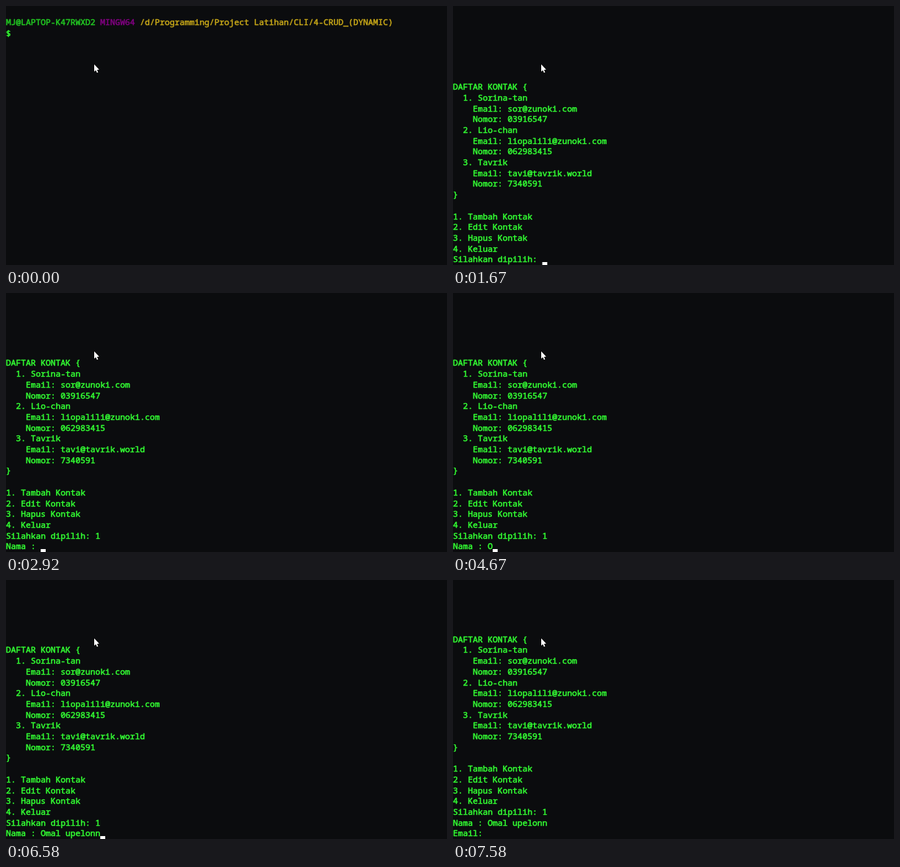
An HTML page with a canvas for the animation above (8000 ms loop, 600 px wide and 353 px high).

```html
<!DOCTYPE html>
<html lang="id">
<head>
<meta charset="utf-8">
<title>Daftar Kontak</title>
<style>
  html, body { margin: 0; width: 100%; height: 100%; overflow: hidden; background: #0b0c0e; }
  canvas { display: block; width: 600px; height: 353px; }
</style>
</head>
<body>
<canvas id="term" width="600" height="353"></canvas>
<script>
const ctx = document.getElementById('term').getContext('2d');
const FPS = 12, TICKS = 96;   // the screen refreshes twelve times a second
const CELL = 6.75, LINE = 14.7, LAST_BASE = 349.3;
const GREEN = '#33ff33', USER = '#22c822', PURPLE = '#800080', GOLD = '#c8a818';

const contacts = [
  ['Sorina-tan', 'sor@zunoki.com', '03916547'],
  ['Lio-chan', 'liopalili@zunoki.com', '062983415'],
  ['Tavrik', 'tavi@tavrik.world', '7340591']
];
const list = [
  'DAFTAR KONTAK {',
  ...contacts.flatMap(([name, mail, phone], i) => [
    `  ${i + 1}. ${name}`, `    Email: ${mail}`, `    Nomor: ${phone}`
  ]),
  '}', '',
  '1. Tambah Kontak', '2. Edit Kontak', '3. Hapus Kontak', '4. Keluar'
];

// Moments in ticks
const ENTER = 17, LISTED = 19, PICKED = 35, NAMED = 83;
const cursorOff = [[0, 1], [28, 30], [34, 35], [47, 53], [91, TICKS]];

const typed = (text, tick, start, gap = 1) =>
  text.slice(0, Math.max(0, Math.floor((tick - start) / gap) + 1));

const baseline = up => LAST_BASE - up * LINE;   // rows count up from the bottom

function write(text, col, up, color = GREEN) {
  ctx.fillStyle = ctx.strokeStyle = color;
  ctx.lineWidth = 0.5;   // thickens the strokes a little
  [...text].forEach((ch, i) => {
    const x = (col + i) * CELL;
    ctx.fillText(ch, x, baseline(up));
    ctx.strokeText(ch, x, baseline(up));
  });
}

function drawCursor(col, up, tick) {
  if (cursorOff.some(([from, to]) => tick >= from && tick < to)) return;
  ctx.fillStyle = '#fff';
  ctx.fillRect(col * CELL, Math.round(baseline(up) - 0.3), CELL, 4);
}

function drawShell(tick) {
  const line = '$ ' + typed('node', tick, 7) + typed(' .', tick, 12, 2);
  write('MJ@LAPTOP-K47RWXD2', 0, 22, USER);
  write('MINGW64', 19, 22, PURPLE);
  write('/d/Programming/Project Latihan/CLI/4-CRUD_(DYNAMIC)', 27, 22, GOLD);
  write(line, 0, 21);
  if (tick < ENTER) drawCursor(line.length, 21, tick);
  else drawCursor(0, 20, tick);
}

function drawApp(tick) {
  const lines = [...list, 'Silahkan dipilih: ' + typed('1', tick, 30)];
  if (tick >= PICKED) {
    lines.push('Nama : ' + typed('Omal', tick, 55, 2) + typed(' upelonn', tick, 64, 11 / 7));
  }
  if (tick >= NAMED) lines.push('Email: ');
  const end = lines.length - 1;
  lines.forEach((line, i) => write(line, 0, end - i));
  drawCursor(lines[end].length, 0, tick);
}

function drawPointer() {
  const shape = [[0, 0], [0, 10], [2.2, 8], [3.8, 11.6], [5.4, 10.9], [3.9, 7.4], [6.8, 7.2]];
  ctx.beginPath();
  shape.forEach(([x, y]) => ctx.lineTo(120 + x, 79.5 + y));
  ctx.closePath();
  ctx.strokeStyle = '#000';
  ctx.lineWidth = 1;
  ctx.stroke();
  ctx.fillStyle = '#fff';
  ctx.fill();
}

let start;
function draw(now) {
  start ??= now;
  // 5 ms of slack keeps rounded times on the right tick
  const tick = Math.floor((now - start + 5) * FPS / 1000) % TICKS;
  ctx.fillStyle = '#0b0c0e';
  ctx.fillRect(0, 0, 600, 353);
  ctx.font = '500 11.25px "Noto Sans Mono", "DejaVu Sans Mono", monospace';
  ctx.lineJoin = 'round';
  if (tick < LISTED) drawShell(tick);
  else drawApp(tick);
  drawPointer();
  requestAnimationFrame(draw);
}
requestAnimationFrame(draw);
</script>
</body>
</html>
```
